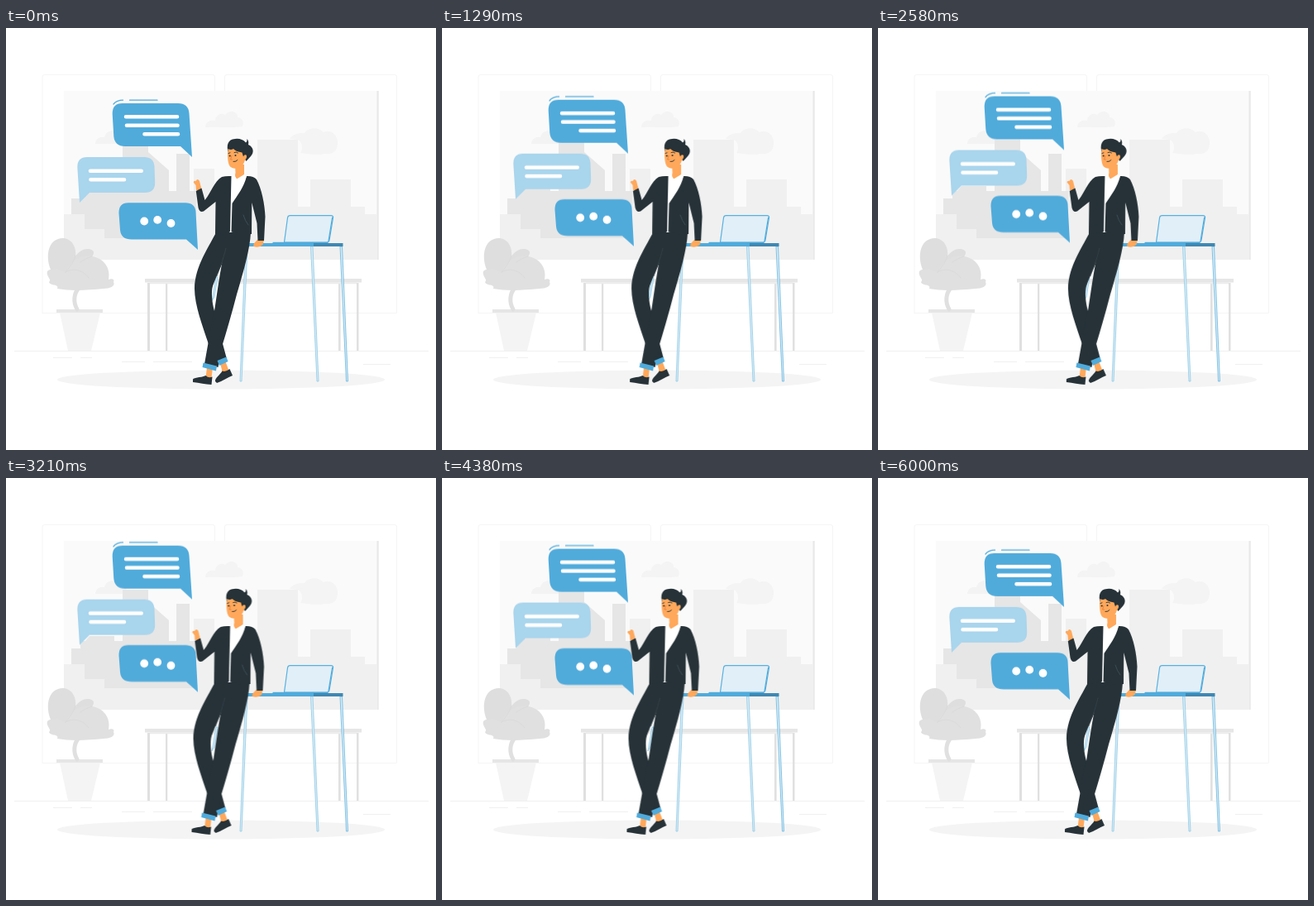
Recreate the animation shown at these times as an HTML page without scripts. Size 520 by 510 pixels, loop 6040 ms.

```html
<!DOCTYPE html>
<html lang="en">
<head>
<meta charset="utf-8">
<title>Office chat</title>
<style>
  html, body { margin: 0; width: 100%; height: 100%; overflow: hidden; background: #fff; }
  svg { display: block; width: 520px; height: 510px; }
  .blue { fill: #50abdb; }
  .dark { fill: #263238; }
  .skin { fill: #ffa85b; }
  .g1 { fill: #f0f0f0; }
  .g2 { fill: #e6e6e6; }
  .g3 { fill: #e0e0e0; }
  .line { fill: none; stroke-linecap: round; stroke-linejoin: round; }
  .text { stroke: #fff; stroke-width: 4.6; }
  .leg { fill: #d9ecf6; stroke: #8fc9e6; stroke-width: .8; }
  .bubbles { animation: float 6040ms linear infinite; }
  .man { animation: shake 6040ms linear infinite; }
  @keyframes float { 50% { transform: translateY(-10px); } }
  @keyframes shake {
    10%, 90% { transform: translateX(-1px); }
    20%, 80% { transform: translateX(2px); }
    30%, 50%, 70% { transform: translateX(-4px); }
    40%, 60% { transform: translateX(4px); }
  }
</style>
</head>
<body>
<svg viewBox="0 0 520 510">
  <!-- window -->
  <g fill="none" stroke="#f5f5f5">
    <path d="M44 345V59q0-2.500 2.500-2.500H250q2.500 0 2.500 2.500V76M264.500 76V59q0-2.500 2.500-2.500H470q2.500 0 2.500 2.500V344.500H44"/>
  </g>
  <path fill="#fafafa" d="M70 76H450V280H70z"/>
  <g fill="#f3f3f3">
    <path d="M108 140C108 134 114 131 119 132C121 125 127 123 132 125C138 122 146 126 146 140z"/>
  </g>
  <path class="g1" d="M227 280V170H252V205H304V135H353V216H368V183H417V216H434V225H448V280z"/>
  <g fill="#f4f4f4">
    <path d="M241 120C241 114 247 110 253 112C253 104 262 102 265 105C270 98 281 101 280 108C286 108 288 114 286 119C273 121 256 119 241 120z"/>
    <path d="M343 134C348 127 355 127 361 127C365 120 378 119 384 126C392 122 402 129 401 140C401 149 394 153 386 152C376 154 364 152 356 151C360 146 358 137 353 135z"/>
  </g>
  <path class="g2" d="M79 255V206H90V197H96L101 191H131V197H141V135H172V150L197 172V197H206V152H222V197H230V255z"/>
  <path class="g1" d="M70 280V225H95V243H119V254H252V280z"/>
  <path fill="#e8e8e8" d="M448.500 76H450.700V280H448.500z"/>

  <!-- floor -->
  <g fill="none" stroke="#f0f0f0">
    <path d="M10 390.500H511M57 398.500H80M90 398.500H104M140 403.500H168M178 403.500H225M432 406.500H465"/>
  </g>
  <ellipse cx="260" cy="425" rx="198" ry="11.500" fill="#f4f4f4"/>

  <!-- bench -->
  <path class="g2" d="M168 303H430V307.500H168z"/>
  <path class="g3" d="M171 308h3v82h-3zM193 308h2.300v82h-2.300zM402 308h2.600v82h-2.600zM424 308h2.500v82h-2.500z"/>
  <path fill="#ebebeb" d="M174 307.500H424V309.300H174z"/>

  <!-- plant -->
  <path fill="#f4f4f4" d="M65 344H114L103 390H75z"/>
  <path class="g2" d="M61 340H117V344H61z"/>
  <path class="line" stroke="#e0e0e0" stroke-width="5" stroke-linecap="butt" d="M88 314C82 321 81 331 86 340"/>
  <path fill="#dedede" d="M54 292C48 278 50 259 63 255C75 251 86 261 84 276C90 267 99 265 105 269C109 273 101 279 98 284L86 302z"/>
  <path class="g3" d="M62 315C65 309 53 312 52 307C56 304 48 300 50 294C55 288 67 293 72 295C77 282 90 273 104 276C118 278 127 290 124 304C128 302 132 304 130 307C133 312 125 315 118 315C99 317 77 318 62 315z"/>
  <path class="line" stroke="#d8d8d8" stroke-width=".8" d="M84 275C81 285 76 290 72 295M72 295C82 289 94 293 100 302M104 276C98 278 94 280 90 283"/>

  <!-- table and laptop -->
  <path class="leg" d="M289.500 264h2.500L285 427h-2zM368.500 264h2.500L378 427h-2z"/>
  <path class="leg" style="stroke:#66b5df" d="M404 264h2.500L413.500 427h-2z"/>
  <path class="leg" d="M254 301L256 301 252 325 249 330z"/>
  <path class="blue" d="M286 260H373V264H286z"/>
  <path fill="#3f88b3" d="M372 260H407.500V264H372z"/>
  <path fill="#e1eff8" stroke="#58b0de" stroke-width="1.200" d="M343.500 226.700H393Q396 226.700 395.500 229.500L391 256.500Q390.500 259 388 259H336.500L340.500 229.500Q341 226.700 343.500 226.700z"/>
  <path class="line" stroke="#50abdb" stroke-width="1.200" d="M323 259.400H389M394.600 229L390 257.500"/>

  <!-- speech -->
  <g class="bubbles">
    <path class="line" stroke="#50abdb" stroke-width="1.300" d="M130 92Q134 87.300 141.500 87.200M149.500 87.200H183"/>
    <path class="blue" d="M141 91H208Q220.500 91 221.500 103L225 156 211 143H144Q131.500 143 130.300 131L128.700 104Q128.300 91 141 91z"/>
    <path class="line text" d="M145 107.200H207M146 117.700H207.500M167.500 128.200H208"/>
    <path fill="#a9d5ed" d="M98 156H167Q178.500 156 179.500 167L180.200 187Q180.200 199 168 199H101L89 211 86.300 168Q86.300 156 98 156z"/>
    <path class="line text" d="M102 172.700H163.700M102.500 183.200H143"/>
    <path class="blue" d="M148 211.200H217Q228.500 211.200 229.500 222L232 268 218 255.500H152Q139 255.500 138 244L136.500 224Q136 211.200 148 211.200z"/>
    <g fill="#fff">
      <circle cx="167.200" cy="233.500" r="4.900"/>
      <circle cx="183.200" cy="231.900" r="4.900"/>
      <circle cx="199.500" cy="236" r="4.900"/>
    </g>
  </g>

  <g class="man">
    <!-- feet -->
    <path class="skin" d="M243 410H250L248.500 423H241.500zM259 405L265 402 269.500 414 262 417z"/>
    <path class="dark" d="M226 425C226 422 235 423 241.500 420Q245 423.500 249.500 421.500L248.500 431C241 431 234 428.500 226 428zM253 427C252.500 423 259 419 261.500 414.500Q266 416 270.500 412L274 420C268 422 262 427 255 429z"/>
    <!-- trousers -->
    <path class="dark" d="M254 247C247 262 228 288 228 315C228 335 238 361 245 382L256 406 267 400 260 374 252 342C249 331 248 319 250 312C253 303 259 291 265 276L278 247z"/>
    <path class="dark" d="M262 247H296C295 268 287 295 279 322C273 345 267 366 260.500 387L256.500 410 240 406 245 378C247 364 250 350 252 342C255 322 258 300 262 280z"/>
    <path class="line" stroke="#3a474e" stroke-width=".7" d="M266 266C262 282 258 291 255 300"/>
    <path class="blue" d="M238.500 404.500L255 408.500 254 414.500 237.500 410zM255.500 402L266.500 397.500 268.500 403 258 408z"/>
    <!-- hands -->
    <path class="skin" d="M230 196L229.500 190 226.700 186.500Q227 184 229.500 185L231 183Q234 183 234.500 187L236 193 236.500 196zM304 256L312 256.500 310.500 262Q306 266 299.500 264Q298.500 262 301 259z"/>
    <!-- shirt and jacket -->
    <path fill="#fff" d="M270 181L277 177 291 179 290 200 274 247H270z"/>
    <path class="skin" d="M277 165H288V177Q285 182 279 182.500Q276 180 277.500 175z"/>
    <path class="dark" d="M261 180Q266 178.500 272.500 179L271 246 269 247.500 253 249 253.500 210 239 221.500Q234 223.500 232.500 217L229.800 197 236.500 193.500 240.500 208C248 199 252 185 261 180z"/>
    <path class="dark" d="M291 179Q299 178.500 303 183C309 194 313 213 313.500 228L312 257H304.500L303.500 236 297.300 211 297 249 286 249.500 272.500 246.500 273.500 212C280 202 288 192 291 179z"/>
    <path class="line" stroke="#46555d" stroke-width=".8" d="M287 226Q289 233 293 238"/>
    <path fill="#fff" d="M276 178L279 182.500 288 177 291 180 280 186 275 184z"/>
    <!-- head -->
    <path class="skin" d="M268.500 146C267.500 153 268 164 271 167.500Q275 171.500 283 168C287 166 288 162 289 160Q292 159 291.500 154L287 145z"/>
    <path class="dark" d="M268.500 150C266.500 142 268 134.500 277 134Q285 133 290 138.500Q292 137 291.500 134Q294 137 293 141C300 144 300 151 296 155L290.500 161 289.500 159Q292 156 290.500 153.500Q288 152.500 287 155.500L285.500 150.500Q278 149.500 275 146Q272 148 268.500 146z"/>
    <g class="dark">
      <circle cx="270.700" cy="154.500" r="1"/>
      <circle cx="277.500" cy="154" r="1"/>
    </g>
    <path class="line" stroke="#263238" stroke-width=".9" d="M276 150.500Q278 149 280.500 151M269 151.500L271 150.800M275 161.500Q278.500 162 280 159.500"/>
    <path class="line" stroke="#e07a3c" stroke-width=".8" d="M273 154.500L271.500 159H273.500"/>
  </g>
</svg>
</body>
</html>
```
